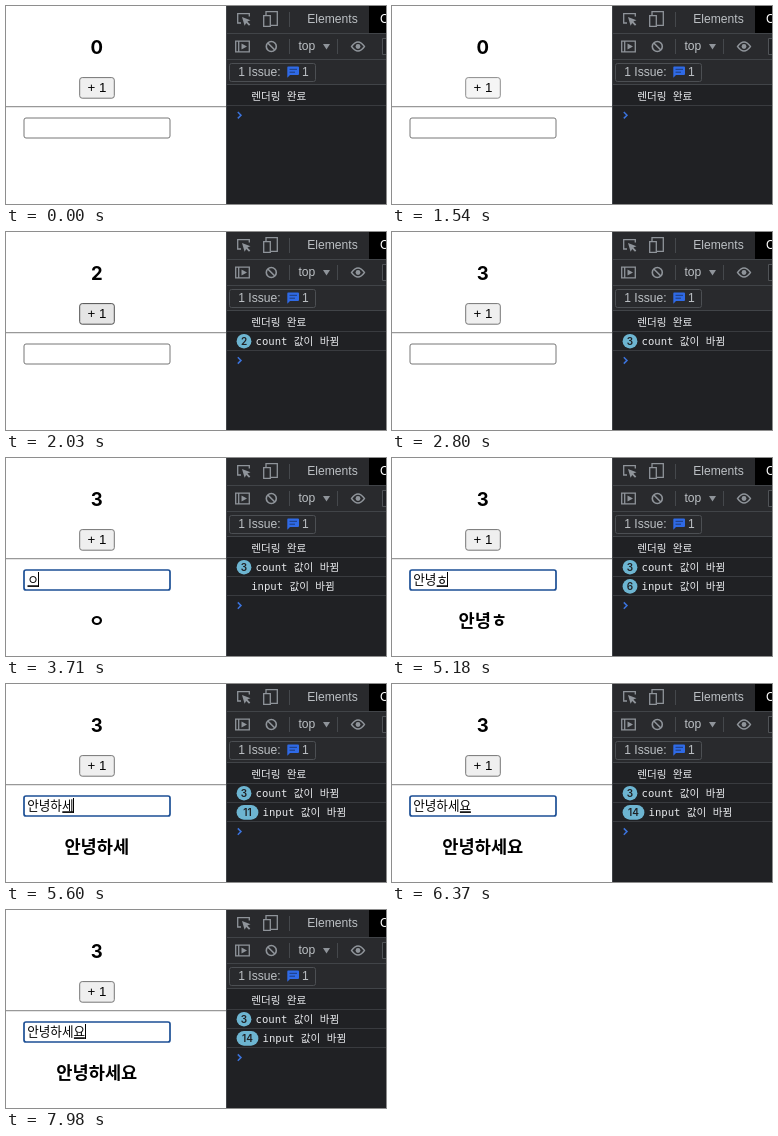
An HTML page that plays this animation: 380 px wide and 198 px high, repeating every 8120 ms.

```html
<!DOCTYPE html>
<html lang="ko">
<head>
<meta charset="utf-8">
<title>useEffect counter</title>
<style>
  html, body { margin: 0; width: 100%; height: 100%; overflow: hidden; background: #fff; }
  svg { display: block; width: 380px; height: 198px; }
  text { white-space: pre; }
  .page { font-family: "Noto Sans CJK KR", "Noto Sans CJK", sans-serif; fill: #000; }
  .big { font-size: 17.6px; font-weight: 700; text-anchor: middle; }
  .digit { font: 700 18.5px Inter, sans-serif; text-anchor: middle; }
  .ui { font: 12.1px "Liberation Sans", sans-serif; fill: #bcc0c4; }
  .log { font: 10.6px "DejaVu Sans Mono", "Noto Sans CJK KR", "Noto Sans CJK", monospace; fill: #e8eaed; }
  .badge { font: 600 10px Inter, sans-serif; fill: #202124; text-anchor: middle; }
  .icon { fill: none; stroke: #8f949a; stroke-width: 1.3; }
  .rule { stroke: #393b3f; }
</style>
</head>
<body>
<svg viewBox="0 0 380 198">
  <rect width="220" height="198" fill="#fff"/>
  <text id="count" class="digit" x="90.8" y="48.2">0</text>
  <rect id="button" x="73.7" y="71.6" width="34.6" height="20.6" rx="2.5"/>
  <text x="91" y="86.3" font-family="Liberation Sans, sans-serif" font-size="13.3" text-anchor="middle">+ 1</text>
  <path d="M0 100.7H220" stroke="#999" stroke-width="1.3"/>
  <rect id="field" x="18" y="112" width="146" height="20" rx="2" fill="#fff"/>
  <text id="typed" class="page" x="21.2" y="125.6" font-size="12.6"></text>
  <rect id="underline" y="127.3" width="11" height="1.6"/>
  <rect id="caret" y="114" width="1" height="15"/>
  <text id="echo" class="page big" x="90.8" y="168.8"></text>

  <rect x="220" width="160" height="198" fill="#202124"/>
  <rect x="221" width="159" height="78" fill="#292a2d"/>
  <rect x="363" width="17" height="27" fill="#000"/>
  <path d="M220.5 0V198M221 27.5H380M221 53.5H380M221 78.5H380" stroke="#414448" fill="none"/>
  <path d="M283.5 6V21M283.5 33V48M331.5 33V48" stroke="#45484c"/>

  <path class="icon" d="M235 17H231.7V7.7H243.3V10.5"/>
  <path d="M236 11L244.5 14.2L241.4 15.6L244.3 18.6L243 19.8L240.2 16.9L238.6 19.8Z" fill="#8f949a"/>
  <path class="icon" d="M260 9V5.7H271.3V19.3H265M257.7 9.7H264.3V20.3H257.7Z"/>
  <text class="ui" x="301.3" y="17.3">Elements</text>
  <text class="ui" x="374" y="17.3" style="fill:#fff">Console</text>

  <path class="icon" d="M229.7 35.2H243.3V45.8H229.7ZM232.7 35V46"/>
  <path d="M235.5 37.5L241 40.5L235.5 43.5Z" fill="#8f949a"/>
  <g class="icon" style="stroke-width:1.6">
    <circle cx="265.3" cy="40.5" r="5"/>
    <path d="M261.8 37L268.8 44"/>
  </g>
  <text class="ui" x="292.5" y="44.3">top</text>
  <path d="M317 38H324L320.5 43.5Z" fill="#8f949a"/>
  <path class="icon" d="M345.5 40.5Q352 31.5 358.5 40.5Q352 49.5 345.5 40.5Z"/>
  <circle cx="352" cy="40.5" r="2.4" fill="#8f949a"/>
  <path d="M380 32.5H376.5V48.5H380" fill="#202124" stroke="#505357"/>

  <rect x="223.5" y="57.5" width="86" height="18" rx="2" fill="none" stroke="#4c4f53"/>
  <text class="ui" x="232.2" y="70.4">1 Issue:</text>
  <path d="M282 60.5H292Q293 60.5 293 61.5V68Q293 69 292 69H284L281.3 71.7V61.5Q281.3 60.5 282 60.5Z" fill="#2f6ae6"/>
  <path d="M283.5 63.3H291M283.5 66.2H289" stroke="#1d3a78"/>
  <text class="ui" x="296" y="70.4">1</text>

  <g id="rows"></g>
  <path id="prompt" d="M231.8 -3.2L235 0L231.8 3.2" fill="none" stroke="#3b73dc" stroke-width="1.5"/>
</svg>
<script>
const LOOP = 8120, ROW = 19.2;
const $ = id => document.getElementById(id);

// [time, ...values]; the last step reached is in force
const counts = [[0, 0], [1750, 1], [2030, 2], [2520, 3]];
const buttons = [[0, 'rest'], [1120, 'hover'], [1540, 'active'], [1750, 'hover'], [1960, 'active'],
  [2030, 'hover'], [2450, 'active'], [2520, 'hover'], [2800, 'rest']];
const typing = [[0, ''], [3710, 'ㅇ'], [4480, '아'], [4620, '안'], [4760, '안ㄴ'], [4900, '안녀'],
  [5040, '안녕'], [5180, '안녕ㅎ'], [5320, '안녕하'], [5460, '안녕핫'], [5600, '안녕하세'],
  [5740, '안녕하셍'], [5880, '안녕하세요']];
const inputLogs = [[0, 0], [3710, 1], [4480, 2], [4690, 3], [4760, 4], [4970, 5], [5040, 6],
  [5250, 7], [5390, 8], [5460, 9], [5600, 11], [5740, 12], [5880, 14]];
const carets = [[0, false], [3360, true], [4200, false], [4480, true], [6300, false],
  [6930, true], [7420, false], [7980, true]];
const rings = [[0, '#767676', 1], [3360, '#6d8fbc', 1.4], [3500, '#1c4f95', 1.7]];
const skins = {
  rest: ['#efefef', '#767676'],
  hover: ['#e5e5e5', '#4f4f4f'],
  active: ['#f5f5f5', '#8d8d8d']
};

const at = (steps, t) => steps.findLast(s => s[0] <= t).slice(1);

function set(el, attrs) {
  for (const k in attrs) el.setAttribute(k, attrs[k]);
}

function logRow(label, repeats, i) {
  const y = 90 + i * ROW;
  const wide = repeats > 9 ? 7 : 0;
  const badge = repeats > 1
    ? `<rect x="230.6" y="${y - 7.3}" width="${14.8 + wide}" height="14.6" rx="7.3" fill="#6db5d1"/>
       <text class="badge" x="${238 + wide / 2}" y="${y + 3.6}">${repeats}</text>` : '';
  const x = repeats > 1 ? 249.6 + wide : 245.2;
  const line = Math.round(y + 9) + 0.5;
  return `${badge}<text class="log" x="${x}" y="${y + 3.8}">${label}</text>
    <path class="rule" d="M221 ${line}H380"/>`;
}

let shown = '';
function draw(t) {
  const [count] = at(counts, t);
  const [fill, stroke] = skins[at(buttons, t)[0]];
  const [text] = at(typing, t);
  const [ring, width] = at(rings, t);
  const [logged] = at(inputLogs, t);
  const [caretOn] = at(carets, t);
  const reloading = t >= 420 && t < 490;

  const key = [count, fill, text, ring, logged, caretOn, reloading].join();
  if (key === shown) return;
  shown = key;

  $('count').textContent = count;
  set($('button'), { fill, stroke });
  set($('field'), { stroke: ring, 'stroke-width': width });
  $('typed').textContent = $('echo').textContent = text;

  const end = 21.2 + text.length * 11.6;
  set($('underline'), { x: end - 11.3, opacity: text ? 1 : 0 });
  set($('caret'), { x: Math.round(end - 0.7), opacity: caretOn ? 1 : 0 });

  const logs = [
    ['렌더링 완료', reloading ? 0 : 1],
    ['count 값이 바뀜', count],
    ['input 값이 바뀜', logged]
  ].filter(([, n]) => n);
  $('rows').innerHTML = logs.map(([label, n], i) => logRow(label, n, i)).join('');
  set($('prompt'), { transform: `translate(0 ${90 + logs.length * ROW})` });
}

const start = performance.now();
function tick() {
  draw((performance.now() - start) % LOOP);
  requestAnimationFrame(tick);
}
tick();
</script>
</body>
</html>
```
